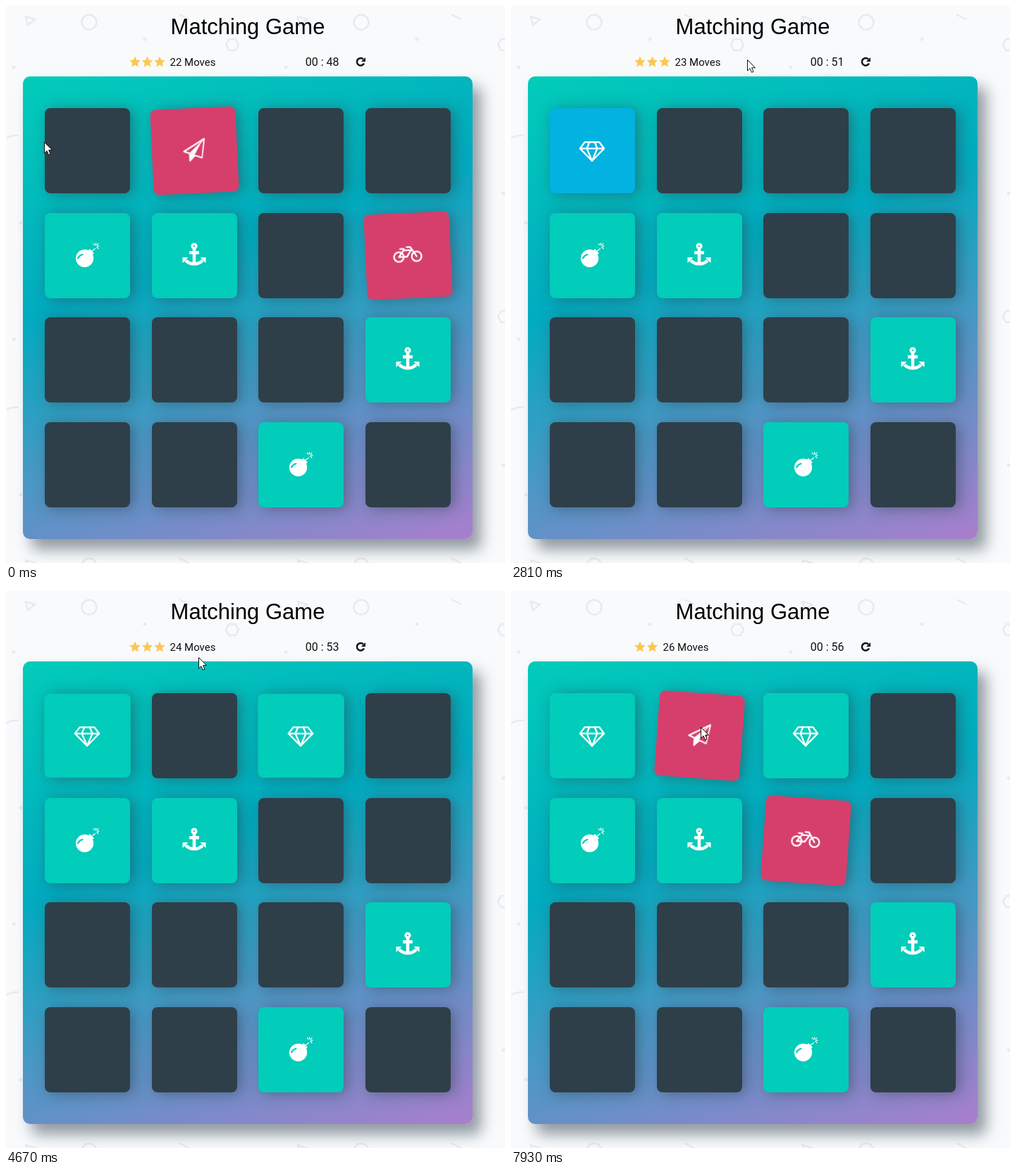
Animation of 708x791 px, one loop 8000 ms. Source, as an HTML page:

```html
<!DOCTYPE html>
<html lang="en">
<head>
<meta charset="utf-8">
<title>Matching Game</title>
<style>
  html, body { margin: 0; width: 100%; height: 100%; overflow: hidden; background: #f8fafc; }
  #stage { position: relative; width: 708px; height: 791px; overflow: hidden; }
  #stage > svg { position: absolute; left: 0; top: 0; }
  .panel {
    position: absolute; left: 24px; top: 100px; width: 638px; height: 657px; border-radius: 10px;
    background: linear-gradient(160deg, #02ccba 0%, #02abbf 39%, #aa7ecd 100%);
    box-shadow: 12px 15px 20px rgba(46, 61, 73, .5);
  }
  .card {
    position: absolute; width: 121px; height: 121px; border-radius: 8px;
    background: #2e3f49; box-shadow: 5px 2px 20px rgba(46, 61, 73, .5);
  }
  .card svg { position: absolute; left: 30px; top: 30px; width: 60px; height: 60px; visibility: hidden; }
  .open { background: #02b2e0; }
  .match { background: #02ccba; }
  .miss { background: #d63f6c; }
  .open svg, .match svg, .miss svg { visibility: visible; }
  .title { font: 31px "Liberation Sans", Arial, sans-serif; text-anchor: middle; }
  .stat { font: 15px Roboto, sans-serif; fill: #111; }
  #clock { font-size: 16px; text-anchor: end; }
  .line { fill: none; stroke: #fff; stroke-width: 2.3; stroke-linejoin: round; stroke-linecap: round; }
</style>
</head>
<body>
<div id="stage">
  <svg width="708" height="791">
    <defs>
      <pattern id="tile" width="386" height="386" patternUnits="userSpaceOnUse">
        <g fill="none" stroke="#e8ebee" stroke-width="2.5">
          <path d="M28 15L41 19L31 27ZM246 12L260 19M0 188Q8 183 18 184"/>
          <circle cx="118" cy="23" r="10.5"/>
          <path d="M312 55L316.5 47H325.5L330 55L325.5 63H316.5Z"/>
        </g>
        <path stroke="#e8ebee" stroke-width="5" stroke-linecap="round" d="M197 47h0M11 87h0M21 308h0M320 266h0"/>
      </pattern>
      <path id="star" fill="#fcc750" d="M0-8L2.3-2.7L7.7-2.2L3.6 1.5L4.8 7L0 4.1L-4.8 7L-3.6 1.5L-7.7-2.2L-2.3-2.7Z"/>

      <g id="diamond" class="line">
        <path d="M-10.3-11.7H10.3L17-2.6L0 15L-17-2.6Z"/>
        <path d="M-17-2.6H17M-3.7-11.7L-7.4-2.6L0 15L7.4-2.6L3.7-11.7"/>
      </g>
      <g id="bomb">
        <circle cx="-3.4" cy="4.3" r="12.6" fill="#fff"/>
        <path fill="#fff" d="M2-7L4-9L9.8-3L8-1Z"/>
        <path class="line" stroke-linecap="butt" style="stroke-width:1.2" d="M6.3-5.5L11.4-9.3M11.2-14.3L9.2-16.300M12.600-14.900V-17.300M14-14.300L16-16.300M14.600-12.900H17M14-11.500L16-9.500"/>
        <path class="line" style="stroke:#02ccba" d="M-12.700 4A9 9 0 0 1-6.700-1"/>
      </g>
      <g id="anchor">
        <circle class="line" cy="-12.900" r="2.900" style="stroke-width:3.400"/>
        <path class="line" style="stroke-width:4.500;stroke-linecap:butt" d="M0-10V12M-6.900-3.700H6.900M-12 7.300Q-7.500 12.300 0 12.300Q7.500 12.300 12 7.300"/>
        <path fill="#fff" d="M-16.500 3V11L-8.500 3ZM16.500 3V11L8.500 3Z"/>
      </g>
      <g id="plane">
        <path class="line" d="M-6.500 4L-14.500 1L14.700-15.700L10.400 10.700L.6 7"/>
        <path fill="#fff" d="M-7.500 4L14-15L1 6V8.500L-6 15.500H-7.500Z"/>
        <path fill="#d63f6c" d="M9-8.300L.6 6L10.200 9.600L13.500-13.500Z"/>
      </g>
      <g id="bike" class="line">
        <circle cx="-12.600" cy="2" r="6.900"/><circle cx="12.600" cy="2" r="6.900"/>
        <path d="M-12.600 2L-5.700-7.100H5L-1.100 2ZM-1.100 2H-5M-5.700-7.100V-9.400M-10.500-9.400H-5M-1-11.700H4L12.600 2"/>
      </g>
    </defs>
    <rect width="708" height="791" fill="url(#tile)"/>
    <text class="title" x="343" y="39.5">Matching Game</text>
    <use href="#star" x="183" y="79.5"/>
    <use href="#star" x="200.5" y="79.5"/>
    <use href="#star" x="218" y="79.5" id="thirdStar"/>
    <text class="stat" id="moves" y="85"></text>
    <text class="stat" id="clock" x="472.5" y="85"></text>
    <path fill="none" stroke="#111" stroke-width="2.5" d="M507 75.500A5.300 5.300 0 1 0 508 81.500"/>
    <path d="M510 73V79H504Z" fill="#111"/>
  </svg>
  <div class="panel"></div>
  <div id="board"></div>
  <svg width="708" height="791">
    <g id="cursor">
      <g fill="#fff" stroke="#111" stroke-linejoin="round">
        <path id="arrow" d="M.5.5V16L4 12.700L6.500 18.300L9 17.200L6.600 11.700H11.500Z"/>
        <path id="hand" d="M-1.500 1.500Q0-.5 1.500 1.500V7Q3 6 4 7.500Q6 6.500 7 8.500Q9 8 9.500 10V15Q9.500 18 7.500 21.500H-1.500Q-3 17-6 13.500Q-6.500 10.500-3.500 11.500L-1.500 13.500Z"/>
      </g>
      <circle id="click" r="11.700" fill="#ff0" fill-opacity=".5"/>
    </g>
  </svg>
</div>
<script>
const LOOP = 8000, CARD = 121, REVEAL_DELAY = 215, MISS_TIME = 1040;
const $ = id => document.getElementById(id);

// A click opens a card; a second card settles the pair as a match or a miss.
const clicks = [
  { at: -855, cards: [1, 7], state: 'miss' },
  { at: 1810, cards: [0], state: 'open' },
  { at: 3810, cards: [0, 2], state: 'match' },
  { at: 5440, cards: [6], state: 'open' },
  { at: 7310, cards: [1, 6], state: 'miss' }
];
const icons = { diamond: [0, 2], plane: [1], bike: [6, 7], bomb: [4, 14], anchor: [5, 11] };
const solved = [...icons.bomb, ...icons.anchor];

const cards = Array.from({ length: 16 }, (_, i) => {
  const el = document.createElement('div');
  const x = 55 + 151.6 * (i % 4), y = 145 + 148.7 * Math.floor(i / 4);
  el.style.left = x + 'px';
  el.style.top = y + 'px';
  const icon = Object.keys(icons).find(name => icons[name].includes(i));
  if (icon) el.innerHTML = `<svg viewBox="-30 -30 60 60"><use href="#${icon}"/></svg>`;
  $('board').append(el);
  return { el, x, y };
});

const frames = (points, toTransform) => points.map(([offset, value]) =>
  ({ offset, transform: toTransform(value), easing: 'ease' }));

const flip = frames([[0, 90], [.4, -20], [.6, 10], [.8, -5], [1, 0]],
  a => `perspective(400px) rotateY(${a}deg)`);
flip[0].opacity = 0;
flip[2].opacity = flip[4].opacity = 1;
flip[0].easing = flip[1].easing = 'ease-in';

const stretch = frames(
  [[0, 0], [.3, .25], [.4, -.25], [.5, .15], [.65, -.05], [.75, .05], [1, 0]],
  s => `scale(${1 + s}, ${1 - s})`);

const swing = frames([[0, 0], [.2, 15], [.4, -10], [.6, 5], [.8, -5], [1, 0]],
  a => `rotate(${a}deg)`);

const effects = { open: flip, match: stretch, miss: swing };
const animations = clicks.flatMap(({ at, cards: ids, state }) => ids.map(id => {
  const anim = cards[id].el.animate(effects[state], { delay: at + REVEAL_DELAY, duration: 750 });
  anim.pause();
  return anim;
}));

// Pointer moves; "via" is the point passed halfway along the curve.
const moves = [
  { from: 780, until: 1180, to: [168, 172], via: [293, 92] },
  { from: 1500, until: 1650, to: [143, 189] },
  { from: 2400, until: 3580, to: [393, 199], via: [420, 50] },
  { from: 4300, until: 4670, to: [273, 94], via: [315, 155] },
  { from: 4900, until: 5400, to: [403, 311], via: [290, 190] },
  { from: 6000, until: 6530, to: [167, 66] },
  { from: 6600, until: 6850, to: [269, 193] }
];

function cursorAt(t) {
  let pos = [54, 193];
  for (const { from, until, to, via } of moves) {
    if (t < from) break;
    const u = Math.min(1, (t - from) / (until - from)), k = u * u * (3 - 2 * u);
    pos = pos.map((a, i) => {
      const bend = via ? via[i] - (a + to[i]) / 2 : 0;
      return Math.round(a + (to[i] - a) * k + 4 * k * (1 - k) * bend);
    });
  }
  return pos;
}

function stateAt(id, t) {
  if (solved.includes(id)) return 'match';
  const last = clicks.filter(c => c.cards.includes(id) && t >= c.at + REVEAL_DELAY).pop();
  if (!last) return '';
  const expired = last.state === 'miss' && t >= last.at + REVEAL_DELAY + MISS_TIME;
  return expired ? '' : last.state;
}

function render(t) {
  const states = cards.map((_, id) => stateAt(id, t));
  cards.forEach((c, id) => c.el.className = 'card ' + states[id]);
  animations.forEach(a => a.currentTime = t);

  const starLost = t >= 7310;
  const opened = clicks.filter(c => t >= c.at + REVEAL_DELAY).length;
  $('thirdStar').style.display = starLost ? 'none' : '';
  $('moves').setAttribute('x', starLost ? 215.5 : 232.5);
  $('moves').textContent = `${21 + opened} Moves`;
  $('clock').textContent = `00 : ${48 + Math.floor((t + 690) / 1000)}`;

  const [x, y] = cursorAt(t);
  const overFacedown = cards.some((c, id) => !states[id] &&
    x >= c.x && x <= c.x + CARD && y >= c.y && y <= c.y + CARD);
  $('cursor').setAttribute('transform', `translate(${x} ${y})`);
  $('hand').style.display = overFacedown ? '' : 'none';
  $('arrow').style.display = overFacedown ? 'none' : '';
  $('click').style.display =
    clicks.some(c => t >= c.at && t < c.at + REVEAL_DELAY) ? '' : 'none';
}

const start = performance.now();
function tick() {
  render((performance.now() - start) % LOOP);
  requestAnimationFrame(tick);
}
tick();
</script>
</body>
</html>
```
